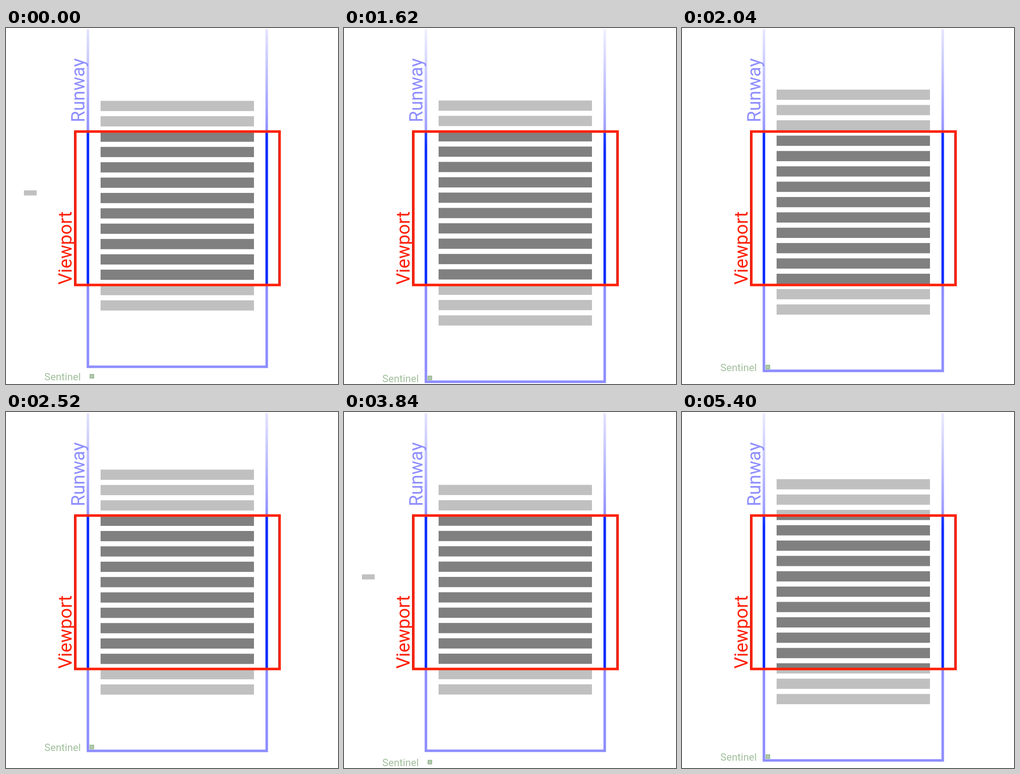
Recreate the animation shown at these times as an HTML page with a canvas. Size 723 px wide and 775 px high, loop 5.46 s.

```html
<!DOCTYPE html>
<html lang="en">
<head>
<meta charset="utf-8">
<title>Infinite scroller runway</title>
<style>
  html, body { margin: 0; width: 100%; height: 100%; overflow: hidden; background: #fff; }
  canvas { display: block; }
</style>
</head>
<body>
<canvas id="stage" width="723" height="775"></canvas>
<script>
const ctx = document.getElementById('stage').getContext('2d');
const W = 723, H = 775, LOOP = 5460, STEP = 60;
const U = 5.567;            // layout unit
const PITCH = 6 * U;        // distance between rows
const LIST = { x: 206, y: 158.6, w: 60 * U, h: 4 * U };
const POOL = { x: 39, y: 353.4, w: 5 * U, h: 2 * U };
const VIEW = { x: 150.9, y: 225.4, w: 80 * U - 0.5, h: 60 * U };
const RUN = { left: 178.4, right: 567.8, top: 2.8, bottom: 737.5 };
const SENTINEL_Y = 729.1;
const ROWS = 15;
const FONT = 'Roboto, Arial, sans-serif';

// Start of each step, in ms, for both passes of the loop
const PASSES = [
  { sentinel: -288, grow: 400, add: 620, scroll: 1580, recycle: 2668 },
  { sentinel: 3400, grow: 4070, add: 4290, scroll: 5155, recycle: Infinity }
];

const LIGHT = { bar: '#c0c0c0', line: '142,142,255', green: '#a2c09d', hole: '#cfe0cb' };
const FULL = { bar: '#808080', line: '8,44,255', green: '#45813b', hole: '#9fc197' };
const RED = '#ff220a';

const mix = (a, b, k) => a + (b - a) * k;

// cubic-bezier(.25, .1, .25, 1)
function ease(p) {
  if (p <= 0) return 0;
  if (p >= 1) return 1;
  const curve = (a, b, s) => 3 * (1 - s) * (1 - s) * s * a + 3 * (1 - s) * s * s * b + s * s * s;
  let lo = 0, hi = 1;
  for (let i = 0; i < 24; i++) {
    const mid = (lo + hi) / 2;
    if (curve(0.25, 0.25, mid) < p) lo = mid; else hi = mid;
  }
  return curve(0.1, 1, lo);
}

function stateAt(t) {
  const pass = PASSES[t < PASSES[1].sentinel ? 0 : 1];
  const part = (name, span = 500) => ease((t - pass[name]) / span);
  const scroll = part('scroll', 1050);
  return {
    shift: PITCH * scroll,
    add: part('add'),
    recycle: part('recycle'),
    bottom: RUN.bottom + PITCH * (part('grow') - scroll),
    sentinel: SENTINEL_Y + PITCH * (part('sentinel') - scroll)
  };
}

function label(text, x, y, size, color, upright) {
  ctx.save();
  ctx.translate(x, y);
  if (upright) ctx.rotate(-Math.PI / 2);
  ctx.font = `${size}px ${FONT}`;
  ctx.fillStyle = color;
  ctx.fillText(text, 0, 0);
  ctx.restore();
}

function drawRunway(bottom, rgb) {
  const fade = ctx.createLinearGradient(0, bottom - 810, 0, bottom - 505);
  fade.addColorStop(0, `rgba(${rgb},0)`);
  fade.addColorStop(1, `rgba(${rgb},1)`);
  ctx.strokeStyle = fade;
  ctx.lineWidth = U;
  ctx.beginPath();
  ctx.moveTo(RUN.left, RUN.top);
  ctx.lineTo(RUN.left, bottom);
  ctx.lineTo(RUN.right, bottom);
  ctx.lineTo(RUN.right, RUN.top);
  ctx.stroke();
}

function drawRows(s, color) {
  ctx.fillStyle = color;
  for (let i = 0; i < ROWS; i++) {
    const k = i === 0 ? s.recycle : i === ROWS - 1 ? 1 - s.add : 0;
    const y = LIST.y + i * PITCH - s.shift;
    ctx.fillRect(mix(LIST.x, POOL.x, k), mix(y, POOL.y, k),
                 mix(LIST.w, POOL.w, k), mix(LIST.h, POOL.h, k));
  }
}

function drawSentinel(y, colors) {
  label('Sentinel', 83.5, y + 8.9, 4 * U, colors.green);
  ctx.fillStyle = colors.green;
  ctx.fillRect(182, y - 5, 10, 10);
  ctx.fillStyle = colors.hole;
  ctx.fillRect(185.6, y - 1.4, 2.8, 2.8);
}

function drawScene(s, colors) {
  drawRunway(s.bottom, colors.line);
  drawRows(s, colors.bar);
  drawSentinel(s.sentinel, colors);
}

function drawViewport() {
  ctx.strokeStyle = RED;
  ctx.lineWidth = U;
  ctx.strokeRect(VIEW.x, VIEW.y, VIEW.w, VIEW.h);
  ctx.fillStyle = 'rgba(110,0,0,0.55)';
  ctx.fillRect(148.4, VIEW.y, 1, VIEW.h);
  ctx.fillRect(593, VIEW.y + U / 2, 1, VIEW.h - U);
  label('Viewport', 142.9, 558.8, 7.2 * U, RED, true);
}

function draw(t) {
  const s = stateAt(t);
  ctx.fillStyle = '#fff';
  ctx.fillRect(0, 0, W, H);
  drawScene(s, LIGHT);
  label('Runway', 170.8, 205.2, 7.2 * U, `rgb(${LIGHT.line})`, true);

  // Everything inside the viewport shows at full strength
  ctx.save();
  ctx.beginPath();
  ctx.rect(VIEW.x, VIEW.y, VIEW.w, VIEW.h);
  ctx.clip();
  ctx.fillStyle = '#fff';
  ctx.fillRect(VIEW.x, VIEW.y, VIEW.w, VIEW.h);
  drawScene(s, FULL);
  ctx.restore();

  drawViewport();
}

const start = performance.now();
function tick() {
  const t = (performance.now() - start) % LOOP;
  draw(Math.floor(t / STEP) * STEP);
  requestAnimationFrame(tick);
}
tick();
</script>
</body>
</html>
```
